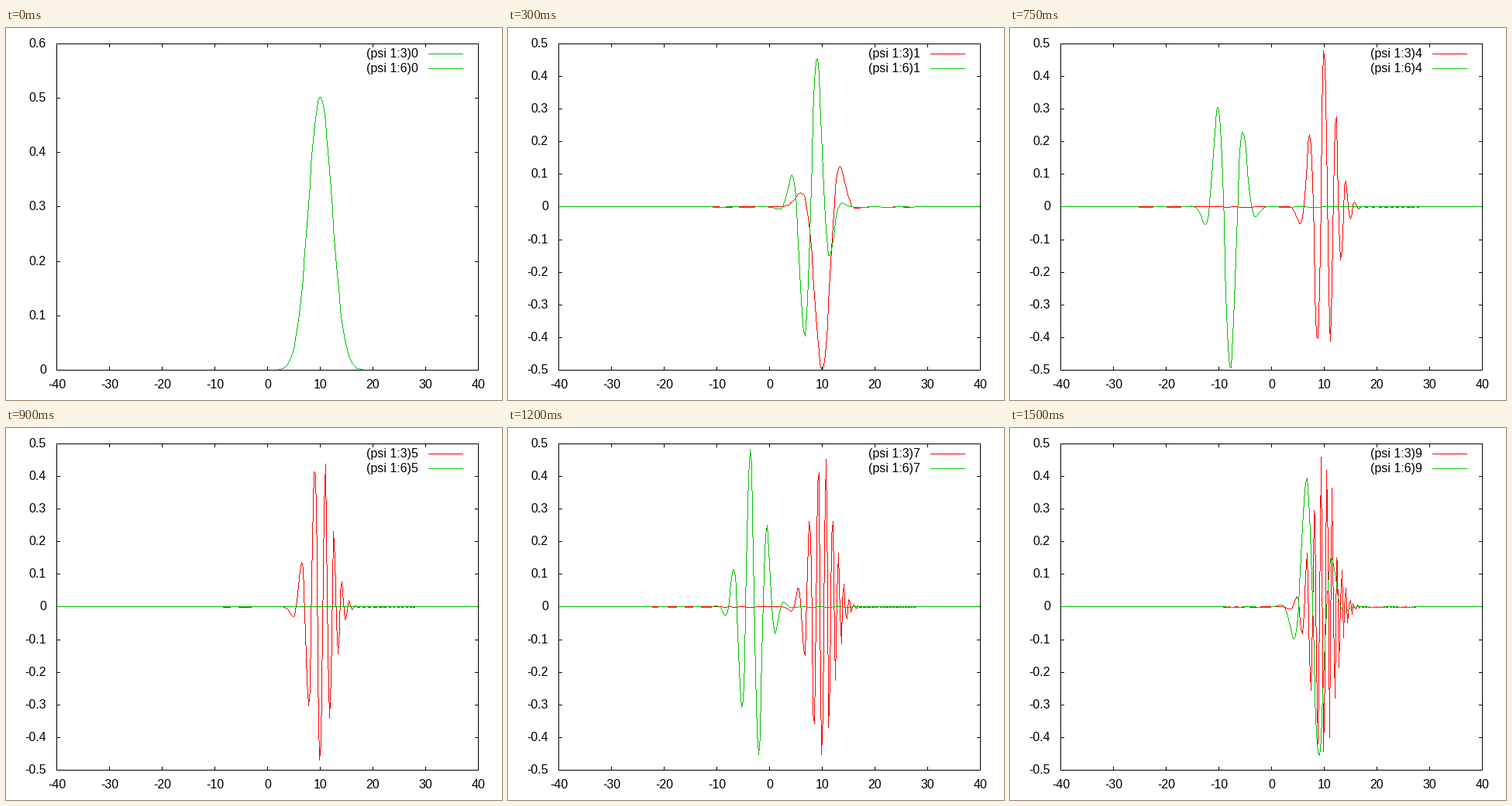
A matplotlib script for the animation above (1650 ms loop, 640 by 480 pixels).

```python
import matplotlib.pyplot as plt
import numpy as np
from matplotlib.animation import FuncAnimation
from matplotlib.collections import PolyCollection

plt.rcParams["font.family"] = "Liberation Sans"

WIDTH, HEIGHT, DPI = 640, 480, 80
LEFT, RIGHT, TOP, BOTTOM = 65, 609, 20, 441
PX = 72 / DPI
RED, GREEN = "#ff0000", "#00c000"
STEPS = [0, 10, *range(1, 10)]  # snapshots play in file-name order
DOT = np.array([(0.25, 0.25), (0.75, 0.25), (0.75, 0.75), (0.25, 0.75)])

X0, PERIOD, WIDTH2 = 10, 10, 5
x = -39.97 + np.arange(300) * 80 / 300


def gaussian(center):
    return (np.pi * WIDTH2) ** -0.25 * np.exp(-((x - center) ** 2) / (2 * WIDTH2))


def potential_only(t):
    """Packet that only picks up the slightly damped phase of the trap."""
    u = (x / X0) ** 2
    phase = np.pi * t * u * (1 + 8e-5 * t * t)
    return gaussian(X0) * np.exp(-0.005 * t * u**2.5) * np.cos(phase)


def coherent(t):
    """Coherent state swinging in a harmonic trap."""
    angle = 2 * np.pi * t / PERIOD
    center = X0 * np.cos(angle)
    momentum = -X0 / WIDTH2 * np.sin(angle)
    return gaussian(center) * np.cos(momentum * (x - center / 2) - angle / 2)


def to_px(value):
    return LEFT + np.floor((value + 40) / 80 * (RIGHT - LEFT) + 0.5)


def to_py(value, low, high):
    return BOTTOM - np.floor((value - low) / (high - low) * (BOTTOM - TOP) + 0.5)


fig = plt.figure(figsize=(WIDTH / DPI, HEIGHT / DPI), dpi=DPI, facecolor="white")
ax = fig.add_axes([0, 0, 1, 1])


def line(px, py, color="black", z=1):
    """Polyline of whole pixels, one pixel per step of the longer axis."""
    points = np.column_stack([px, py]).astype(float)
    runs = [points[:1]]
    for start, end in zip(points[:-1], points[1:]):
        count = max(1, int(np.abs(end - start).max()))
        part = np.arange(1, count + 1)[:, None] / count
        runs.append(np.floor(start + (end - start) * part + 0.5))
    pixels = np.unique(np.concatenate(runs), axis=0)
    ax.add_collection(PolyCollection(pixels[:, None] + DOT, facecolors=color,
                                     linewidths=0, antialiaseds=False, zorder=z),
                      autolim=False)


def label(px, baseline, text, align):
    ax.text(px, baseline, text, size=16 * PX, ha=align, va="baseline", zorder=4)


def draw_axes(low, high):
    for value in range(-40, 41, 10):
        px = to_px(value)
        line([px, px], [BOTTOM, BOTTOM - 4])
        line([px, px], [TOP, TOP + 4])
        label(px + 0.5, 465, str(value), "center")
    for tenth in range(round(low * 10), round(high * 10) + 1):
        py = to_py(tenth / 10, low, high)
        line([LEFT, LEFT + 4], [py, py])
        line([RIGHT, RIGHT - 4], [py, py])
        label(52, py + 5, f"{tenth / 10:g}", "right")
    line([LEFT, RIGHT, RIGHT, LEFT, LEFT], [TOP, TOP, BOTTOM, BOTTOM, TOP], z=3)


def draw(index):
    t = STEPS[index]
    curves = [potential_only(t), coherent(t)]
    low = np.floor(np.min(curves) * 10) / 10
    high = np.ceil(np.max(curves) * 10) / 10

    ax.clear()
    ax.set(xlim=(0, WIDTH), ylim=(HEIGHT, 0))
    ax.axis("off")
    draw_axes(low, high)

    colors = [GREEN if t == 0 else RED, GREEN]
    for curve, color, column, row in zip(curves, colors, (3, 6), (33, 52)):
        line(to_px(x), to_py(curve, low, high), color, z=2)
        line([545, 589], [row, row], color, z=2)
        label(532, row + 5, f"(psi 1:{column}){t}", "right")
    return []


anim = FuncAnimation(fig, draw, frames=len(STEPS), interval=150, init_func=lambda: [],
                     repeat=True, repeat_delay=0, blit=False)
plt.show()
```
